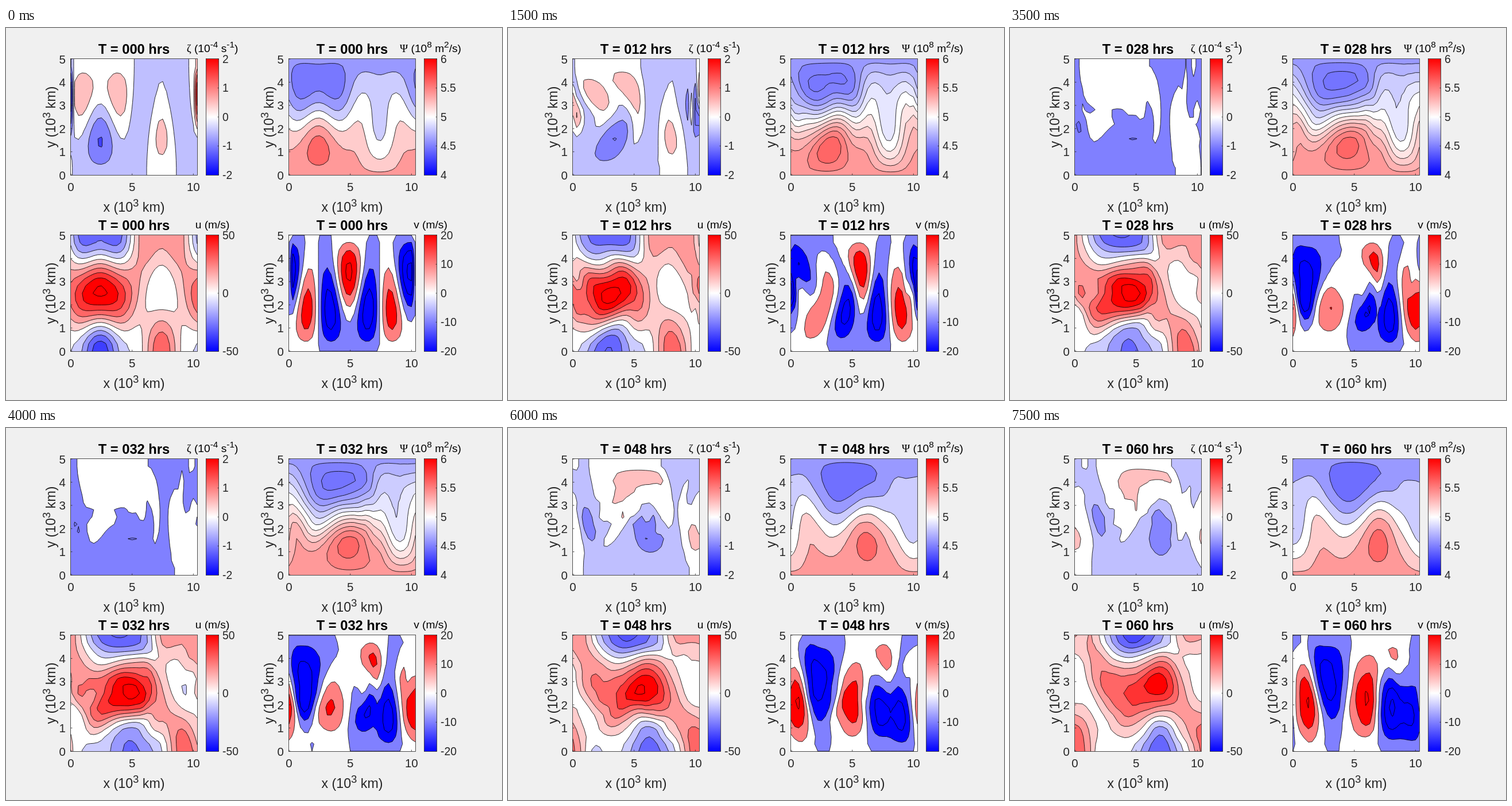
An HTML page with a canvas that plays this animation: 864x648 px, repeating every 8000 ms.

```html
<!DOCTYPE html>
<html>
<head>
<meta charset="utf-8">
<style>
html, body { margin: 0; width: 100%; height: 100%; overflow: hidden; background: #f0f0f0; }
canvas { display: block; }
</style>
</head>
<body>
<canvas id="stage" width="864" height="648"></canvas>
<script>
const ctx = document.getElementById('stage').getContext('2d');
const SANS = '"Liberation Sans", Arial, sans-serif';
const SERIF = '"Liberation Serif", "DejaVu Sans", serif';

// Barotropic vorticity model; lengths in 1000 km, psi in 1e8 m2/s, zeta in 1e-4 1/s
const NX = 34, NY = 17, D = 0.3125, HOUR = 0.36, DAMPING = 5e-5;
const FRAMES = 16, HOURS = 4, FRAME_MS = 500, SUBSTEPS = 8;
const at = (i, j) => j * NX + (i + NX) % NX;

function makeField(f) {
  const a = new Float64Array(NX * NY);
  for (let j = 0; j < NY; j++)
    for (let i = 0; i < NX; i++) a[at(i, j)] = f(i, j);
  return a;
}

function eachInner(f) {
  for (let j = 1; j < NY - 1; j++)
    for (let i = 0; i < NX; i++) f(i, j, at(i, j));
}

// Zonal jet plus waves one and three
const psi = makeField((i, j) => {
  const q = 2 * Math.PI * (i * D - 2.4) / 10, y = Math.PI * j / (NY - 1);
  return 5.45 - 0.16 * j * D + (0.127 + 0.25 * Math.cos(q)) * Math.sin(2 * y)
    + 0.125 * Math.cos(3 * q) * Math.sin(y);
});

const around = (p, i, j) => p[at(i + 1, j)] + p[at(i - 1, j)] + p[at(i, j + 1)] + p[at(i, j - 1)];

function copyEdges(f) {
  for (let i = 0; i < NX; i++) {
    f[at(i, 0)] = f[at(i, 1)];
    f[at(i, NY - 1)] = f[at(i, NY - 2)];
  }
}

function laplacian(f) {
  const out = new Float64Array(NX * NY);
  eachInner((i, j, c) => { out[c] = (around(f, i, j) - 4 * f[c]) / (D * D); });
  copyEdges(out);
  return out;
}

// Over-relaxation, warm-started from the last stream function
function solve(z) {
  for (let n = 0; n < 40; n++)
    eachInner((i, j, c) => {
      psi[c] += 0.425 * (around(psi, i, j) - D * D * z[c] - 4 * psi[c]);
    });
}

function tendency(z) {
  copyEdges(z);
  solve(z);
  const out = new Float64Array(NX * NY), p = psi;
  const rough = laplacian(laplacian(z));
  eachInner((i, j, c) => {
    const E = at(i + 1, j), W = at(i - 1, j), N = at(i, j + 1), S = at(i, j - 1);
    const NE = at(i + 1, j + 1), NW = at(i - 1, j + 1), SE = at(i + 1, j - 1), SW = at(i - 1, j - 1);
    // Arakawa Jacobian
    const jac = (p[E] - p[W]) * (z[N] - z[S]) - (p[N] - p[S]) * (z[E] - z[W])
      + p[E] * (z[NE] - z[SE]) - p[W] * (z[NW] - z[SW])
      - p[N] * (z[NE] - z[NW]) + p[S] * (z[SE] - z[SW])
      + p[NE] * (z[N] - z[E]) - p[SW] * (z[W] - z[S])
      - p[NW] * (z[N] - z[W]) + p[SE] * (z[E] - z[S]);
    out[c] = -HOUR * jac / (12 * D * D) - DAMPING * rough[c];
  });
  return out;
}

function step(z, dt) {
  const plus = (k, h) => z.map((v, c) => v + k[c] * h);
  const k1 = tendency(z), k2 = tendency(plus(k1, dt / 2));
  const k3 = tendency(plus(k2, dt / 2)), k4 = tendency(plus(k3, dt));
  const next = z.map((v, c) => v + dt / 6 * (k1[c] + 2 * k2[c] + 2 * k3[c] + k4[c]));
  copyEdges(next);
  return next;
}

function simulate() {
  let zeta = laplacian(psi);
  const list = [];
  for (let n = 0; n < FRAMES; n++) {
    if (n) {
      for (let s = 0; s < SUBSTEPS; s++) zeta = step(zeta, HOURS / SUBSTEPS);
      solve(zeta);
    }
    const p = psi.slice();
    list.push({
      zeta,
      psi: p,
      u: makeField((i, j) => {
        const n = Math.min(j + 1, NY - 1), s = Math.max(j - 1, 0);
        return -100 * (p[at(i, n)] - p[at(i, s)]) / ((n - s) * D);
      }),
      v: makeField((i, j) => 100 * (p[at(i + 1, j)] - p[at(i - 1, j)]) / (2 * D))
    });
  }
  return list;
}

const PW = 220, PH = 202;
const panels = [
  { key: 'zeta', x: 113, y: 54, mid: 0, half: 2, ticks: [-2, -1, 0, 1, 2], name: 'ζ (10^-4 s^-1)',
    step: n => n === 7 || n === 8 ? 1 : 0.5 },
  { key: 'psi', x: 493, y: 54, mid: 5, half: 1, ticks: [4, 4.5, 5, 5.5, 6], name: 'Ψ (10^8 m^2/s)',
    step: n => n > 0 && n < 9 ? 0.1 : 0.2 },
  { key: 'u', x: 113, y: 361, mid: 0, half: 50, ticks: [-50, 0, 50], name: 'u (m/s)', step: () => 10 },
  { key: 'v', x: 493, y: 361, mid: 0, half: 20, ticks: [-20, -10, 0, 10, 20], name: 'v (m/s)', step: () => 10 }
];

function colour(value, { mid, half }) {
  const c = Math.max(-1, Math.min(1, (value - mid) / half));
  const pale = Math.round(255 * (1 - Math.abs(c)));
  return c < 0 ? `rgb(${pale},${pale},255)` : `rgb(255,${pale},${pale})`;
}

// Adds one cell's part above the level to area, and its contour to lines
function traceCell(corners, level, area, lines) {
  const pts = [], cuts = [];
  corners.forEach((a, k) => {
    const b = corners[(k + 1) % 4], inside = a.v >= level;
    if (inside) pts.push(a);
    if (inside !== (b.v >= level)) {
      const f = (level - a.v) / (b.v - a.v);
      const cut = { x: a.x + f * (b.x - a.x), y: a.y + f * (b.y - a.y), leaving: inside };
      pts.push(cut);
      cuts.push(cut);
    }
  });
  if (pts.length < 3) return;
  pts.forEach((p, k) => k ? area.lineTo(p.x, p.y) : area.moveTo(p.x, p.y));
  area.closePath();
  cuts.forEach((c, k) => {
    if (!c.leaving) return;
    const to = cuts[(k + 1) % cuts.length];
    lines.moveTo(c.x, c.y);
    lines.lineTo(to.x, to.y);
  });
}

function drawContours(panel, data, gap) {
  const min = Math.min(...data), max = Math.max(...data);
  const lines = new Path2D();
  const node = (i, j) => ({
    x: panel.x + PW * i / (NX - 1), y: panel.y + PH * (1 - j / (NY - 1)), v: data[at(i, j)]
  });
  ctx.fillStyle = colour(min, panel);
  ctx.fillRect(panel.x, panel.y, PW, PH);
  for (let n = Math.floor(min / gap) + 1; n * gap <= max; n++) {
    const area = new Path2D();
    for (let j = 0; j < NY - 1; j++)
      for (let i = 0; i < NX - 1; i++)
        traceCell([node(i, j), node(i + 1, j), node(i + 1, j + 1), node(i, j + 1)], n * gap, area, lines);
    ctx.fillStyle = colour(n * gap, panel);
    ctx.fill(area);
  }
  ctx.strokeStyle = '#000';
  ctx.lineWidth = 0.8;
  ctx.stroke(lines);
}

function text(str, x, y, size, align = 'center', weight = '') {
  ctx.font = `${weight} ${size}px ${SANS}`;
  ctx.textAlign = align;
  ctx.fillText(str, x, y);
}

// "^3" is raised, Greek letters are set in serif
function richText(str, x, y, size) {
  const runs = str.split(/(\^-?\d|[ζΨ])/).filter(Boolean).map(s => {
    const up = s[0] === '^', greek = /[ζΨ]/.test(s);
    const font = `${up ? size * 0.8 : size}px ${greek ? SERIF : SANS}`;
    ctx.font = font;
    const label = up ? s.slice(1) : s;
    return { label, font, rise: up ? size * 0.4 : 0, width: ctx.measureText(label).width };
  });
  ctx.textAlign = 'left';
  x -= runs.reduce((sum, r) => sum + r.width, 0) / 2;
  for (const r of runs) {
    ctx.font = r.font;
    ctx.fillText(r.label, x, y - r.rise);
    x += r.width;
  }
}

function drawAxes(panel, hours) {
  const { x, y, mid, half } = panel, bottom = y + PH, cx = x + PW / 2;
  ctx.strokeStyle = ctx.fillStyle = '#262626';
  ctx.lineWidth = 0.8;
  ctx.strokeRect(x - 0.5, y - 0.5, PW + 1, PH + 1);
  ctx.beginPath();
  for (let k = 0; k <= 5; k++) {
    const ty = bottom - PH * k / 5;
    ctx.moveTo(x, ty);
    ctx.lineTo(x + 2.5, ty);
    text(k, x - 9, ty + 7.5, 20.5, 'right');
  }
  for (const k of [0, 5, 10]) {
    const tx = x + PW * k / 10.3125;
    ctx.moveTo(tx, bottom);
    ctx.lineTo(tx, bottom - 2.5);
    text(k, tx, bottom + 27.5, 20.5);
  }
  ctx.stroke();
  richText('x (10^3 km)', cx, bottom + 64, 23.2);
  ctx.save();
  ctx.translate(x - 27, y + PH / 2);
  ctx.rotate(-Math.PI / 2);
  richText('y (10^3 km)', 0, 0, 23.2);
  ctx.restore();

  const bar = x + 235.5, grad = ctx.createLinearGradient(0, bottom, 0, y);
  ['#00f', '#fff', '#f00'].forEach((c, k) => grad.addColorStop(k / 2, c));
  ctx.fillStyle = grad;
  ctx.fillRect(bar, y, 22, PH);
  ctx.strokeRect(bar, y - 0.5, 22, PH + 1);
  ctx.fillStyle = '#262626';
  ctx.beginPath();
  for (const t of panel.ticks) {
    const ty = bottom - PH * (t - mid + half) / (2 * half);
    ctx.moveTo(bar + 22, ty);
    ctx.lineTo(bar + 20, ty);
    text(t, x + 264, ty + 6.5, 19.3, 'left');
  }
  ctx.stroke();

  ctx.fillStyle = '#000';
  richText(panel.name, bar + 11, y - 12.5, 19.2);
  text(`T = ${String(hours).padStart(3, '0')} hrs`, cx, y - 9, 23.7, 'center', 'bold');
}

const frames = simulate();
let shown = -1;

function render(now) {
  const n = Math.floor(now / FRAME_MS) % FRAMES;
  if (n !== shown) {
    shown = n;
    ctx.fillStyle = '#f0f0f0';
    ctx.fillRect(0, 0, 864, 648);
    for (const panel of panels) {
      drawContours(panel, frames[n][panel.key], panel.step(n));
      drawAxes(panel, n * HOURS);
    }
  }
  requestAnimationFrame(render);
}
render(performance.now());
</script>
</body>
</html>
```
